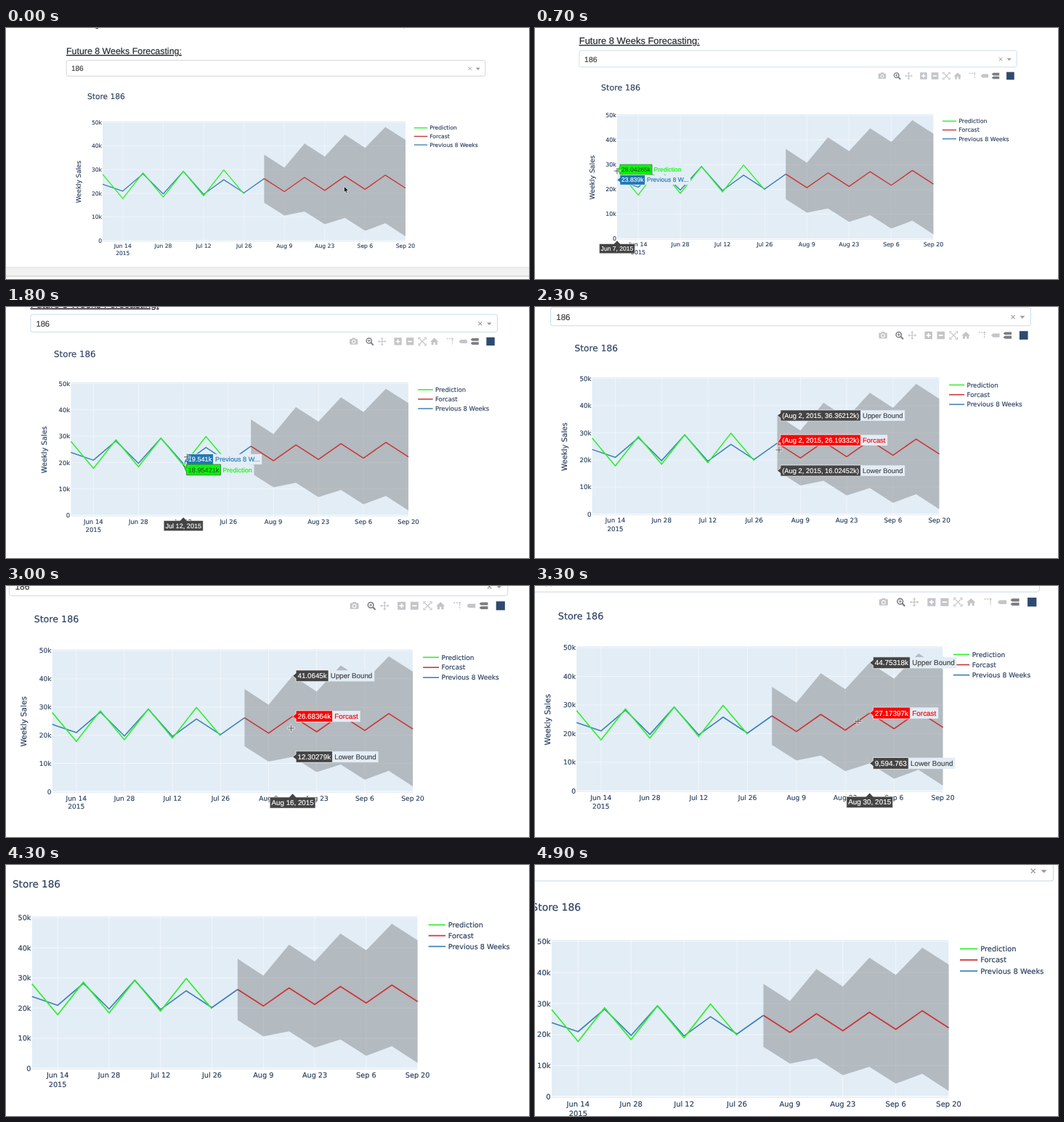
An HTML page for the animation above (5000 ms loop, 720 by 346 pixels).

```html
<!DOCTYPE html>
<html lang="en">
<head>
<meta charset="utf-8">
<title>Weekly sales forecast</title>
<style>
  html, body { margin: 0; width: 100%; height: 100%; overflow: hidden; background: #fff; }
  svg { display: block; width: 720px; height: 346px; }
  text { white-space: pre; text-rendering: geometricPrecision; stroke-width: .14; }
  .ui { font-family: "Liberation Sans", Arial, sans-serif; }
  .plot { font-family: "DejaVu Sans", Verdana, sans-serif; fill: #2a3f5f; stroke: #2a3f5f; }
</style>
</head>
<body>
<svg id="stage" viewBox="0 0 720 346"></svg>
<script>
const LOOP = 5000, STEP = 100;
const X0 = 133, WEEK = 27.8, Y0 = 293, UNIT = 3.26;
const X1 = X0 + 15 * WEEK, TOP = 128.5, BOTTOM = 294.5;
const PAPER = '#e3edf6', DARK = '#444';

// Values in thousands, one per week from the given first week.
const series = {
  prediction: { name: 'Prediction', first: 0, line: '#2df02d', tag: '#00ff00', text: DARK, edge: DARK,
    data: [28.04265, 17.76318, 28.64207, 18.3693, 29.27154, 18.95421, 29.86035, 19.74682] },
  forecast: { name: 'Forcast', first: 8, line: '#cc3434', tag: '#ff0000', text: '#fff', edge: '#fff',
    data: [26.19332, 20.69814, 26.68364, 21.18847, 27.17397, 21.6788, 27.66429, 22.16912] },
  previous: { name: 'Previous 8 Weeks', first: 0, line: '#3d82b8', tag: '#1f77b4', text: '#fff', edge: '#fff',
    data: [23.839, 20.908, 28.196, 19.692, 29.251, 19.541, 25.738, 20.174, 26.19332] },
  upper: { name: 'Upper Bound', first: 8, tag: DARK, text: '#fff', edge: '#fff',
    data: [36.36212, 30.80347, 41.0645, 35.50586, 44.75318, 39.19457, 48.00189, 42.54328] },
  lower: { name: 'Lower Bound', first: 8, tag: DARK, text: '#fff', edge: '#fff',
    data: [16.02452, 10.59281, 12.30279, 6.87108, 9.594763, 4.163034, 7.326685, 1.794956] }
};

const px = w => X0 + w * WEEK;
const py = v => Y0 - v * UNIT;
const clamp = v => Math.max(0, Math.min(1, v));
const ease = v => v * v * (3 - 2 * v);
const MONTHS = ['Jan', 'Feb', 'Mar', 'Apr', 'May', 'Jun', 'Jul', 'Aug', 'Sep'];
const dayName = w => {
  const d = new Date(2015, 5, 7 + 7 * w);
  return MONTHS[d.getMonth()] + ' ' + d.getDate();
};

function add(parent, tag, attrs, content) {
  const el = document.createElementNS('http://www.w3.org/2000/svg', tag);
  for (const key in attrs) el.setAttribute(key, attrs[key]);
  if (content !== undefined) el.textContent = content;
  parent.appendChild(el);
  return el;
}
const box = (p, x, y, width, height, fill, more) => add(p, 'rect', { x, y, width, height, fill, ...more });
const stroke = (p, d, color, width, more) =>
  add(p, 'path', { d, fill: 'none', stroke: color, 'stroke-width': width, ...more });
const label = (p, x, y, size, str, more) =>
  add(p, 'text', { x, y, 'font-size': size, class: 'plot', ...more }, str);
const uiText = (p, x, y, size, str, color, more) =>
  label(p, x, y, size, str, { class: 'ui', fill: color, stroke: color, ...more });
const show = (el, on) => el.setAttribute('visibility', on ? 'visible' : 'hidden');
const points = s => s.data.map((v, i) => px(s.first + i) + ',' + py(v));

const stage = document.getElementById('stage');
const page = add(stage, 'g', {});

// Page heading and dropdown
const INK = '#212529';
uiText(page, 122.5, -1.3, 10, 'g', INK);
uiText(page, 547, -1.6, 10, 'p', INK);
uiText(page, 83, 36, 12.4, 'Future 8 Weeks Forecasting:', INK, { 'text-decoration': 'underline' });
const select = box(page, 83.2, 44.6, 576.6, 21.8, '#fff', { rx: 2.5, stroke: '#ccc', 'stroke-width': .8 });
uiText(page, 90, 59.4, 10, '186', '#333');
stroke(page, 'M636.3 53.6l4.6 4.6m0-4.6l-4.6 4.6', '#999', .9);
add(page, 'path', { d: 'M646.8 54.7h6l-3 3.2z', fill: '#999' });

// Chart
label(page, 112, 97.5, 10.63, 'Store 186');
box(page, X0, TOP, X1 - X0, BOTTOM - TOP, PAPER);
const grid = { opacity: .65 };
for (let w = 1; w <= 15; w += 2) {
  stroke(page, `M${px(w)} ${TOP}V${BOTTOM}`, '#fff', .62, grid);
  label(page, px(w), 303.4, 7.6, dayName(w), { 'text-anchor': 'middle' });
}
label(page, px(1), 313.2, 7.6, '2015', { 'text-anchor': 'middle' });
for (let k = 0; k <= 50; k += 10) {
  stroke(page, `M${X0} ${py(k)}H${X1}`, '#fff', k ? .62 : 1.2, grid);
  label(page, 132, py(k) + 2.8, 7.6, k ? k + 'k' : '0', { 'text-anchor': 'end' });
}
label(page, 0, 0, 8.85, 'Weekly Sales', { 'text-anchor': 'middle', transform: 'translate(102.9 212) rotate(-90)' });
add(page, 'polygon', {
  points: points(series.upper).concat(points(series.lower).reverse()).join(' '),
  fill: DARK, 'fill-opacity': .3
});
for (const s of [series.previous, series.forecast, series.prediction])
  stroke(page, 'M' + points(s).join('L'), s.line, 1.35, { 'stroke-linejoin': 'round' });
[series.prediction, series.forecast, series.previous].forEach((s, i) => {
  const y = 137.7 + 11.7 * i;
  stroke(page, `M561.8 ${y}h18.4`, s.line, 1.35);
  label(page, 583.2, y + 2.7, 7.6, s.name);
});

// Toolbar
const bar = add(page, 'g', {});
const PALE = '#c3c5c9', BOLD = '#7b7d81';
const icon = (x, draw) => draw(add(bar, 'g', { transform: `translate(${x} 78)` }));
icon(482.4, g => {
  box(g, -5, -3.2, 10, 7, PALE, { rx: 1 });
  box(g, -2, -4.4, 4, 2, PALE);
  add(g, 'circle', { cx: 0, cy: .3, r: 2, fill: PALE, stroke: '#fff', 'stroke-width': .9 });
});
icon(502.1, g => {
  add(g, 'circle', { cx: -.8, cy: -.8, r: 3.2, fill: 'none', stroke: BOLD, 'stroke-width': 1.3 });
  stroke(g, 'M1.6 1.6L4.6 4.6', BOLD, 1.8);
  stroke(g, 'M-2.4 -.8h3.2M-.8 -2.4v3.2', BOLD, .9);
});
icon(517.4, g => {
  stroke(g, 'M-4 0h8M0-4v8', PALE, 1);
  for (let a = 0; a < 360; a += 90)
    add(g, 'path', { d: 'M-1.7-3.2L0-5.2L1.7-3.2z', fill: PALE, transform: `rotate(${a})` });
});
for (const [x, d] of [[537, 'M-2.6 0h5.2M0-2.6v5.2'], [551.9, 'M-2.6 0h5.2']])
  icon(x, g => {
    box(g, -4.6, -4.6, 9.2, 9.2, PALE, { rx: .6 });
    stroke(g, d, '#fff', 1.5);
  });
icon(567.2, g => {
  stroke(g, 'M-4.6-2.2v-2.4h2.4M2.2-4.6h2.4v2.4M4.6 2.2v2.4h-2.4M-2.2 4.6h-2.4v-2.4', PALE, 1);
  stroke(g, 'M-3.4-3.4L3.4 3.4M3.4-3.4L-3.4 3.4', PALE, 1);
});
icon(582, g => add(g, 'path', { d: 'M-5 .3L0-4.4L5 .3H3.6V4.2H1V1.2H-1V4.2H-3.6V.3z', fill: PALE }));
icon(601.2, g => {
  stroke(g, 'M-4-3.4H1.5M3-2V4.4', PALE, 1.2, { 'stroke-dasharray': '1.8 1.2' });
  box(g, 2, -4.4, 2, 2, PALE);
});
const flag = (g, y, h, color) =>
  add(g, 'path', { d: `M-5 ${y}l2-${h / 2}H5v${h}H-3z`, fill: color });
icon(617.4, g => flag(g, 0, 4.6, PALE));
icon(631.8, g => { flag(g, -2.3, 3.4, BOLD); flag(g, 2.3, 3.4, BOLD); });
icon(651.4, g => box(g, -5.1, -5.1, 10.2, 10.2, '#2f4a70'));

// Hover layer and pointers
const hover = add(page, 'g', {});
const cross = add(page, 'g', {});
stroke(cross, 'M-4.6 0h9.2M0-4.6v9.2', '#fff', 2.4, { opacity: .75 });
stroke(cross, 'M-4 0h8M0-4v8', '#555', .9);
const arrow = add(stage, 'path', {
  d: 'M465.5 218.3v8.2l1.9-1.7l1.3 3l1.5-.7l-1.3-2.8h2.6z',
  fill: '#111', stroke: '#fff', 'stroke-width': .6
});

// Horizontal scrollbar strip that fades away
const strip = add(stage, 'g', {});
box(strip, 0, 329.5, 720, 13, '#f1f1f1');
box(strip, 0, 329.5, 720, 1, '#e4e4e4');
box(strip, 0, 341.5, 720, 1.5, '#d6d6d6');

function format(v) {
  return v < 10 ? (v * 1000).toLocaleString('en-US', { maximumFractionDigits: 3 }) : v + 'k';
}

function drawTag(s, x, y, cy, str) {
  const left = x + 3.8, h = 13.2, pad = 2;
  const g = add(hover, 'g', {});
  const value = uiText(g, left + pad, cy + 2.9, 8.2, str, s.text);
  const w = value.getComputedTextLength() + 2 * pad;
  const short = s.name.length > 15 ? s.name.slice(0, 12) + '...' : s.name;
  const name = uiText(g, left + w + 2.4, cy + 2.9, 8.2, short, s.tag);
  box(g, left + w, cy - 6.4, name.getComputedTextLength() + 4.8, 12.8, PAPER);
  add(g, 'path', {
    d: `M${x} ${y}L${left} ${cy - 3}V${cy - h / 2}h${w}v${h}H${left}V${cy + 3}z`,
    fill: s.tag, stroke: s.edge, 'stroke-width': .6
  });
  g.append(value, name);
}

function drawDate(w) {
  const x = px(w);
  const t = uiText(hover, x, 308.9, 8.2, dayName(w) + ', 2015', '#fff', { 'text-anchor': 'middle' });
  const half = t.getComputedTextLength() / 2 + 2;
  add(hover, 'path', {
    d: `M${x} 295.4l4 4.2H${x + half}v12.8H${x - half}v-12.8H${x - 4}z`,
    fill: DARK, stroke: '#fff', 'stroke-width': .5
  });
  hover.appendChild(t);
}

let shownWeek = -1;
function drawHover(w) {
  if (w === shownWeek) return;
  shownWeek = w;
  hover.replaceChildren();
  if (w < 0) return;
  const { prediction, previous, upper, forecast, lower } = series;
  const tags = (w < 8 ? [prediction, previous] : [upper, forecast, lower])
    .map(s => ({ s, v: s.data[w - s.first] }))
    .sort((a, b) => b.v - a.v);
  tags.forEach(t => { t.y = t.cy = py(t.v); });
  for (let i = 1; i < tags.length; i++) {
    const push = Math.max(0, 13 - (tags[i].cy - tags[i - 1].cy)) / 2;
    tags[i - 1].cy -= push;
    tags[i].cy += push;
  }
  // Where the two lines meet, tags carry the date themselves.
  if (w === 8) tags[1].cy -= 3.5;
  else drawDate(w);
  for (const t of tags)
    drawTag(t.s, px(w), t.y, t.cy, w === 8 ? `(${dayName(w)}, 2015, ${format(t.v)})` : format(t.v));
}

// Pointer path: seconds, x, y
const path = [[0, 467, 221], [.1, 466, 220], [.6, 140, 205], [.7, 133, 203.5], [1.4, 212, 224.8],
  [2.3, 357.5, 215.9], [3, 409.3, 219.7], [3.7, 512.3, 205.7], [4.3, 552, 185]];
function pointer(t) {
  const i = Math.max(1, path.findIndex(p => p[0] >= t));
  const a = path[i - 1], b = path[i];
  const k = clamp((t - a[0]) / (b[0] - a[0]));
  return [a[1] + (b[1] - a[1]) * k, a[2] + (b[2] - a[2]) * k];
}

function render(ms) {
  const t = Math.floor((ms % LOOP) / STEP) * STEP / 1000;
  const zoom = 1 + .0635 * t;
  const dx = -29.9 * t - 5 * clamp(t / .2);
  const dy = -21.8 * t - .2 * clamp(t / .2) + 42 * ease(clamp((t - 4.25) / .5));
  page.setAttribute('transform', `translate(${dx} ${dy}) scale(${zoom})`);
  select.setAttribute('stroke', t < .2 ? '#ccc' : '#c3d9e8');
  strip.setAttribute('opacity', 1 - clamp(t / .4));

  const active = t >= .2 && t < 4.3;
  show(arrow, t < .2);
  show(cross, active);
  show(bar, active);
  if (active) {
    const [x, y] = pointer(t);
    cross.setAttribute('transform', `translate(${x} ${y})`);
    drawHover(Math.max(0, Math.min(15, Math.round((x - X0) / WEEK))));
  } else drawHover(-1);
}

function tick() {
  render(performance.now());
  requestAnimationFrame(tick);
}
tick();
</script>
</body>
</html>
```
